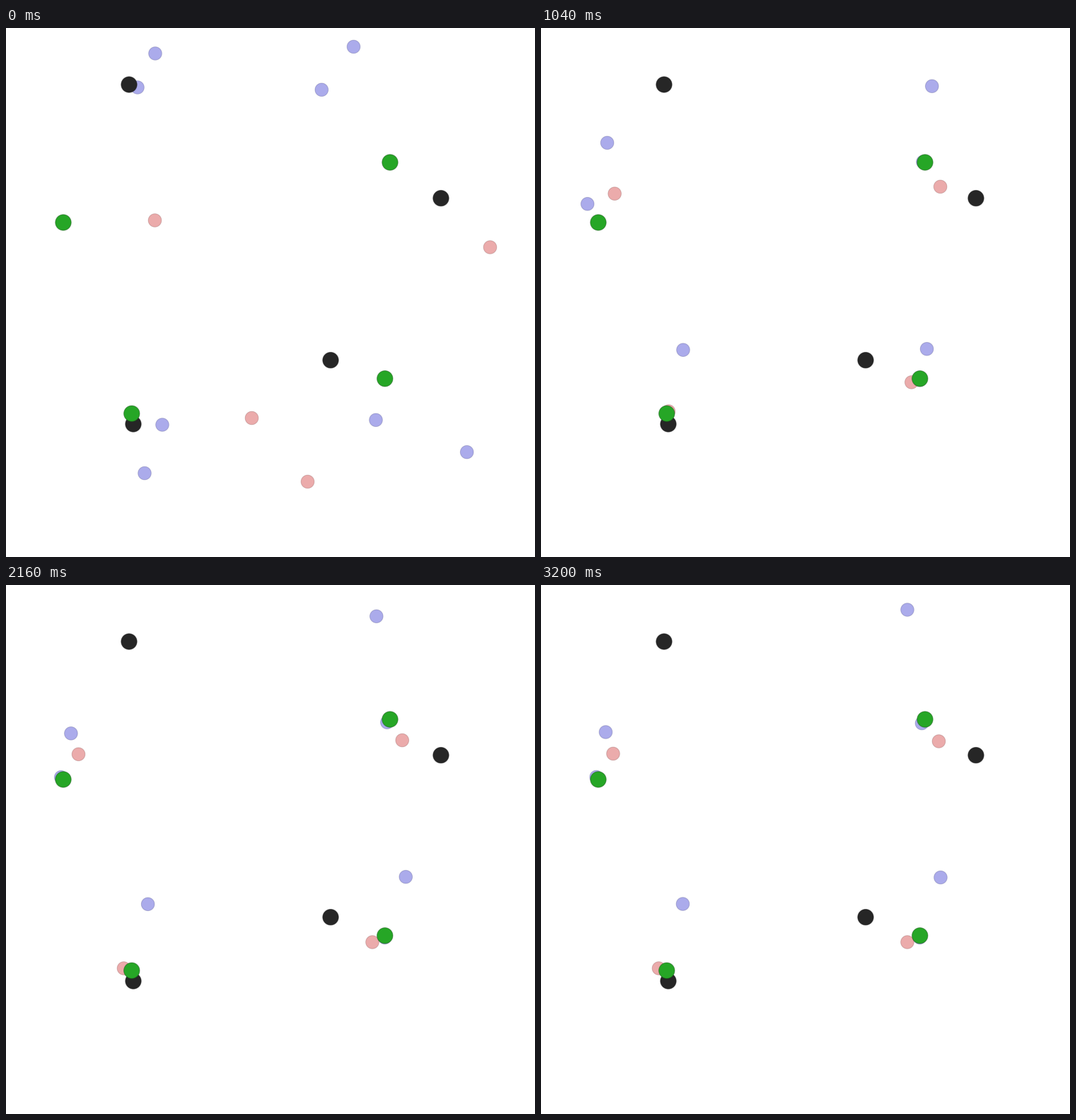
A matplotlib script for the animation above (3.24 s loop, 748 px wide and 748 px high).

```python
import numpy as np
import matplotlib.pyplot as plt
from matplotlib.animation import FuncAnimation
from matplotlib.patches import Polygon

SIZE, FRAMES, STEP_MS, DPI = 748, 81, 40, 100
AGENT_R, MARK_R = 0.0125 * SIZE, 0.015 * SIZE
BLUE, PINK = (0.35, 0.35, 0.85), (0.85, 0.35, 0.35)
GREEN, BLACK = (0.15, 0.65, 0.15), (0.15, 0.15, 0.15)

STEPS = np.array([0, 8, 18, 36])   # start, two way points, arrival
SWAY_FROM, SWAY_GROWTH, SWAY_PERIOD = 20, 40, 24

angles = np.arange(30) * 2 * np.pi / 30
RING = np.column_stack([np.cos(angles), np.sin(angles)])

fig = plt.figure(figsize=(SIZE / DPI, SIZE / DPI), dpi=DPI, facecolor="white")
ax = fig.add_axes([0, 0, 1, 1])
ax.set(xlim=(0, SIZE), ylim=(SIZE, 0))
ax.axis("off")


def disc(center, radius, color, alpha, z):
    """Filled 30-gon with a thin, darker outline."""
    pts = np.asarray(center) + RING * radius
    dark = tuple(c / 2 for c in color)
    fill = Polygon(pts, fc=(*color, alpha), ec="none", lw=0, zorder=z)
    rim = Polygon(pts, fc="none", ec=(*dark, alpha / 2), lw=72 / DPI, zorder=z + 0.1)
    for part in (fill, rim):
        ax.add_patch(part)
    return fill, rim


def travel(way, step):
    """Position on a smooth path that starts and ends at rest without overshoot."""
    if step >= STEPS[-1]:
        return way[-1]
    span = np.diff(STEPS)[:, None]
    speed = np.diff(way, axis=0) / span
    a, b = speed[:-1], speed[1:]
    same = a * b > 0
    mid = np.where(same, 2 * a * b / np.where(same, a + b, 1), 0)
    v = np.vstack([[0, 0], mid, [0, 0]])
    k = np.searchsorted(STEPS, step, "right") - 1
    h = span[k]
    u = (step - STEPS[k]) / h
    return (way[k] + (way[k + 1] - way[k]) * u * u * (3 - 2 * u)
            + h * u * (1 - u) * (v[k] * (1 - u) - v[k + 1] * u))


def swing(step):
    """Growing oscillation shared by all agents once they near their goals."""
    late = step - SWAY_FROM
    return np.clip(late / SWAY_GROWTH, 0, 1) * np.cos(2 * np.pi * late / SWAY_PERIOD)


class Agent:
    def __init__(self, color, *way, sway=(0, 0)):
        self.way, self.sway = np.array(way, float), np.array(sway)
        self.parts = disc(way[0], AGENT_R, color, 0.5, 10)

    def move(self, step):
        pos = travel(self.way, step) + self.sway * swing(step)
        for part in self.parts:
            part.set_xy(pos + RING * AGENT_R)


agents = [
    # upper left
    Agent(BLUE, (211, 36), (129, 78.5), (58, 208), (76.5, 272.5), sway=(-1.7, 1)),
    Agent(BLUE, (186, 84), (142, 87), (95, 110.5), (93, 215), sway=(1.5, 7)),
    Agent(PINK, (210.5, 272), (170, 209), (104.5, 224), (104, 241.5), sway=(2, 3)),
    # upper right
    Agent(BLUE, (491.5, 26.5), (535, 43), (562, 91), (540, 70), sway=(22, 35)),
    Agent(BLUE, (446.3, 87.3), (517, 135.3), (540, 187), (540, 190.5), sway=(1.5, -5)),
    Agent(PINK, (684.5, 310), (642.5, 265), (583, 238), (554, 215.5), sway=(-8.5, -5.5)),
    # lower left
    Agent(BLUE, (221, 561), (188, 511.5), (201, 461.5), (201, 452), sway=(0.5, 1)),
    Agent(BLUE, (196, 629.5), (179, 552), (178, 546), (178, 546)),
    Agent(PINK, (347.5, 551.5), (275, 544), (204, 542), (166.5, 542)),
    # lower right
    Agent(BLUE, (523, 554.3), (545, 448.3), (536, 496), (535.5, 498.5)),
    Agent(BLUE, (651.7, 599.7), (584.7, 563.3), (531, 508), (566, 410.5), sway=(1, -3)),
    Agent(PINK, (426.5, 641.5), (515, 553), (528, 498), (518, 505)),
]

for spot in [(174, 80), (615, 240.7), (459, 469.7), (180, 560)]:
    disc(spot, MARK_R, BLACK, 1, 40)
for spot in [(81, 275), (543, 190), (535.8, 495.8), (177.8, 545.2)]:
    disc(spot, MARK_R, GREEN, 1, 50)


def draw(step):
    for agent in agents:
        agent.move(step)
    return [part for agent in agents for part in agent.parts]


anim = FuncAnimation(fig, draw, frames=FRAMES, interval=STEP_MS,
                     repeat=True, repeat_delay=0, blit=False)
plt.show()
```
